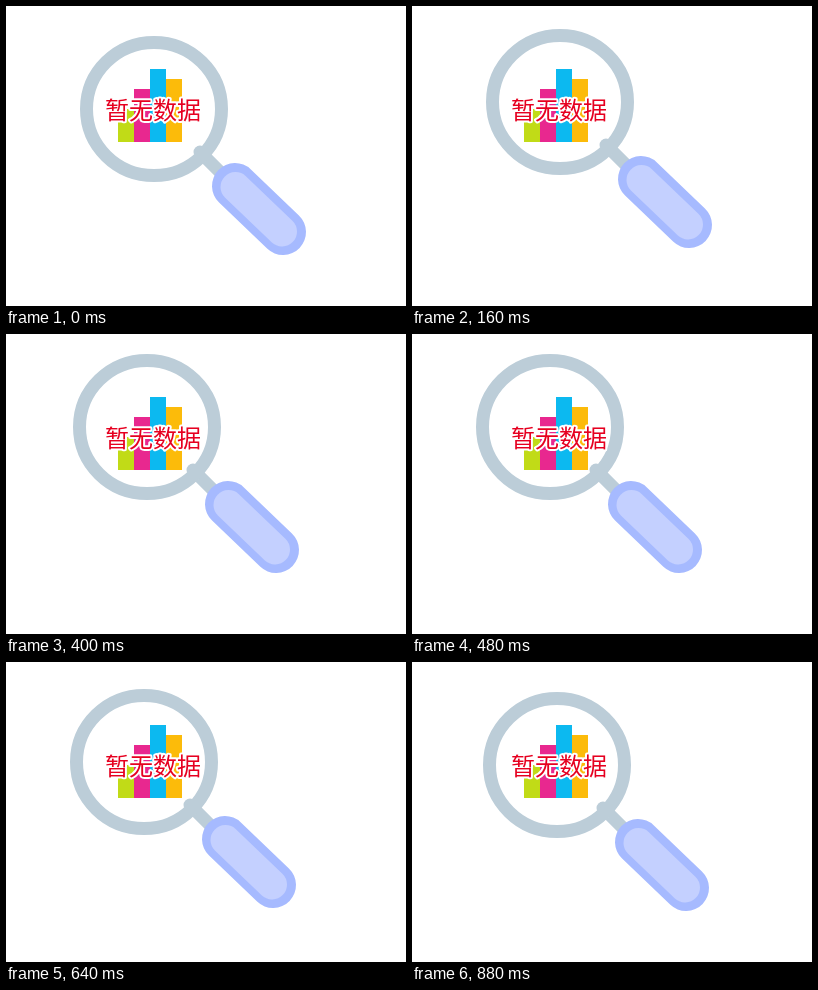
An HTML page that plays this animation: 400x300 px, repeating every 0.96 s.

```html
<!DOCTYPE html>
<html lang="zh-CN">
<head>
<meta charset="utf-8">
<title>暂无数据</title>
<style>
  html, body { margin: 0; width: 100%; height: 100%; overflow: hidden; background: #fff; }
  svg { display: block; width: 400px; height: 300px; }
  text {
    font: 24px "Noto Sans CJK SC", "Noto Sans CJK", sans-serif;
    fill: #e60020;
    stroke: #fff;
    stroke-width: 4px;
    stroke-linejoin: round;
    paint-order: stroke;
  }
  #glass { fill: none; stroke-linecap: round; }
</style>
</head>
<body>
<svg viewBox="0 0 400 300">
  <rect x="112" y="103" width="16" height="33" fill="#c1db17"/>
  <rect x="128" y="83" width="16" height="53" fill="#e8288f"/>
  <rect x="144" y="63" width="16" height="73" fill="#0cb9f0"/>
  <rect x="160" y="73" width="16" height="63" fill="#fcbb0a"/>
  <g id="glass">
    <path d="M194 146L220 172" stroke="#bccdd8" stroke-width="13"/>
    <ellipse cx="148" cy="103" rx="67.5" ry="66.5" stroke="#bccdd8" stroke-width="13"/>
    <path d="M229 180L277 226" stroke="#a6baff" stroke-width="46"/>
    <path d="M229.5 181L276 225.5" stroke="#c4d0ff" stroke-width="30"/>
  </g>
  <text x="99" y="113">暂无数据</text>
</svg>
<script>
  const LOOP = 960, STEP = 80, SIDE = 10, PER_SIDE = 3;
  // Corners of the square path, as offsets from the start
  const corners = [[0, 0], [0, -SIDE], [-SIDE, -SIDE], [-SIDE, 0]];
  const count = LOOP / STEP;

  function pose(i) {
    const side = Math.floor(i / PER_SIDE) % 4;
    const t = (i % PER_SIDE) / PER_SIDE;
    const from = corners[side], to = corners[(side + 1) % 4];
    const [x, y] = from.map((v, k) => Math.round(v + (to[k] - v) * t));
    return { transform: `translate(${x}px, ${y}px)`, offset: i / count, easing: "step-end" };
  }

  const frames = Array.from({ length: count + 1 }, (_, i) => pose(i));
  document.getElementById("glass").animate(frames, { duration: LOOP, iterations: Infinity });
</script>
</body>
</html>
```
